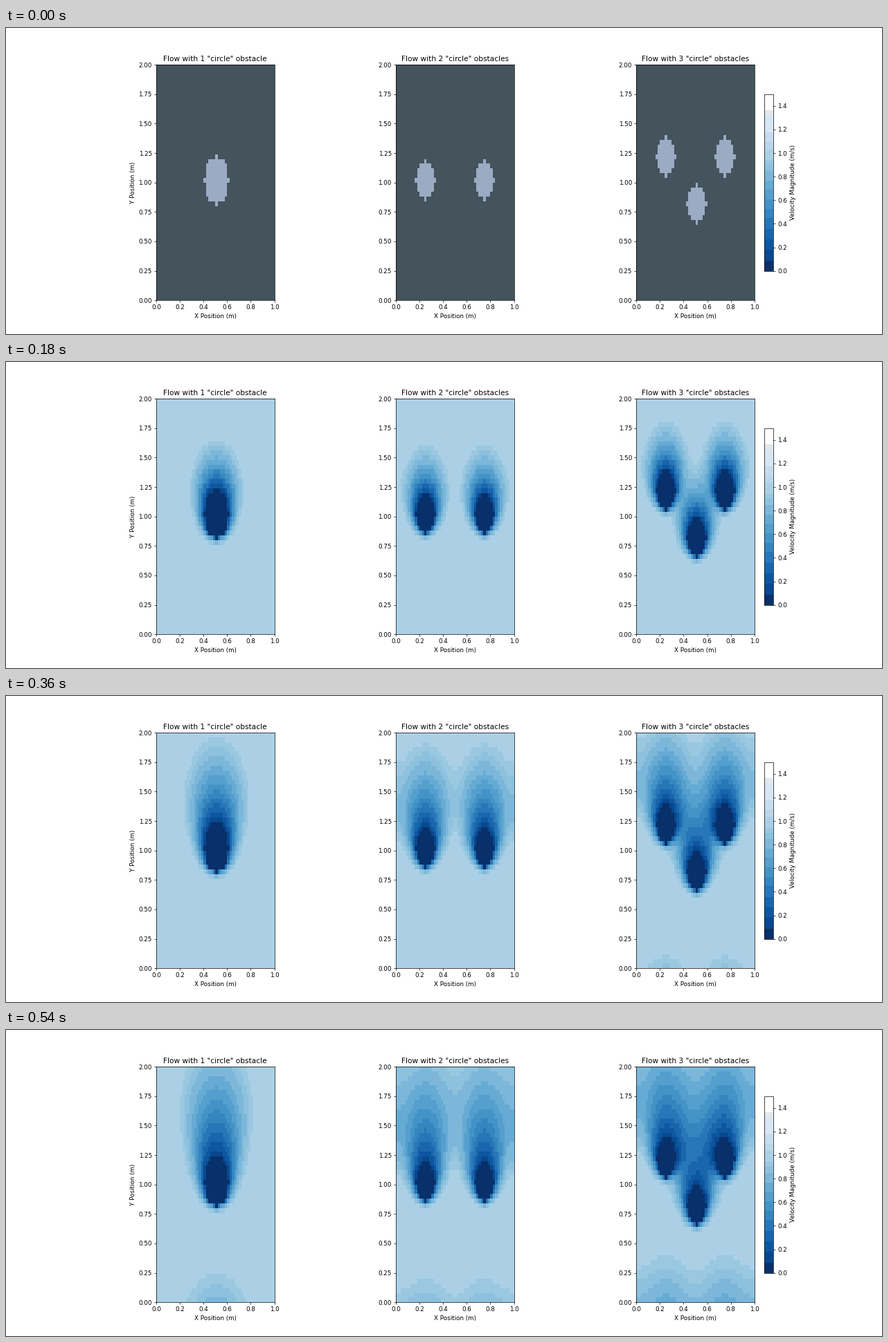
A matplotlib script that plays this animation: 1265x443 px, repeating every 600 ms.

```python
import numpy as np
import matplotlib.pyplot as plt
from matplotlib.animation import FuncAnimation
from matplotlib.colors import ListedColormap

W, H, DPI = 1265, 443, 63.25
FRAMES, INTERVAL = 10, 60

# Flow model: vertical Burgers flow on an N x N grid over a 1 x 2 m domain
N = 50
DX, DY = 1 / (N - 1), 2 / (N - 1)
NU, DT, STEPS = 0.01, 0.01, 10
VMAX = 1.5

# Each panel: obstacle radius in cells, then centres as (column, row)
PANELS = [
    (5, [(25, 25)]),
    (4, [(12, 25), (37, 25)]),
    (4, [(12, 30), (37, 30), (25, 20)]),
]


def obstacle_mask(radius, centres):
    row, col = np.mgrid[:N, :N]
    mask = np.zeros((N, N), bool)
    for cx, cy in centres:
        mask |= (col - cx) ** 2 + (row - cy) ** 2 <= radius ** 2
    return mask


def step(v):
    below, above = np.roll(v, 1, 0), np.roll(v, -1, 0)
    left, right = np.roll(v, 1, 1), np.roll(v, -1, 1)
    spread = (left - 2 * v + right) / DX ** 2 + (below - 2 * v + above) / DY ** 2
    new = v + DT * (NU * spread - v * (v - below) / DY)
    new[:, 0], new[:, -1] = new[:, 1], new[:, -2]
    return new


def simulate(mask):
    v = np.where(mask, 0.0, 1.0)
    fields = [v]
    for _ in range(FRAMES - 1):
        for _ in range(STEPS):
            v = step(v)
            v[mask] = 0
        fields.append(v)
    return fields


def banded_blues():
    edges = np.array([0, .09, .18, .27, .36, .45, .53, .61, .69, .77, .85, .9,
                      .945, 1.04, 1.1, 1.18, 1.32, 1.365, VMAX])
    mids = (edges[:-1] + edges[1:]) / 2
    mids[0] = 0
    mids[np.digitize(1, edges) - 1] = 1
    colors = plt.get_cmap("Blues_r")(mids / VMAX)
    colors[-2, :3] = 0.89, 0.91, 0.93
    colors[-1, :3] = 1
    values = (np.arange(256) + 0.5) / 256 * VMAX
    return ListedColormap(colors[np.digitize(values, edges[1:-1])])


def draw_grid(ax, data, **style):
    return ax.pcolormesh(np.linspace(0, 1, N + 1), np.linspace(0, 2, N + 1),
                         data, vmin=0, **style)


plt.rcParams["font.family"] = "DejaVu Sans"
fig, axes = plt.subplots(1, 3, figsize=(W / DPI, (H + 0.001) / DPI), dpi=DPI,
                         facecolor="white")
cmap = banded_blues()
masks = [obstacle_mask(*panel) for panel in PANELS]
flows = [simulate(mask) for mask in masks]

meshes, overlays = [], []
for k, (ax, mask, flow) in enumerate(zip(axes, masks, flows), 1):
    meshes.append(draw_grid(ax, flow[0], cmap=cmap, vmax=VMAX))
    overlays.append(draw_grid(ax, mask.astype(float), cmap="gray", vmax=1,
                              alpha=0.6))
    ax.set(xlim=(0, 1), ylim=(0, 2), aspect="equal", xlabel="X Position (m)",
           title=f'Flow with {k} "circle" obstacle' + "s" * (k > 1),
           xticks=np.arange(0, 1.1, 0.2), yticks=np.arange(0, 2.1, 0.25))
axes[0].set_ylabel("Y Position (m)")

fig.colorbar(meshes[-1], ax=axes[-1], shrink=0.75, ticks=np.arange(0, 1.5, 0.2),
             label="Velocity Magnitude (m/s)")


def update(i):
    for mesh, overlay, flow in zip(meshes, overlays, flows):
        mesh.set_array(flow[i])
        overlay.set_visible(i == 0)
    return meshes + overlays


anim = FuncAnimation(fig, update, frames=FRAMES, interval=INTERVAL,
                     repeat=True, repeat_delay=0, blit=False)
plt.show()
```
